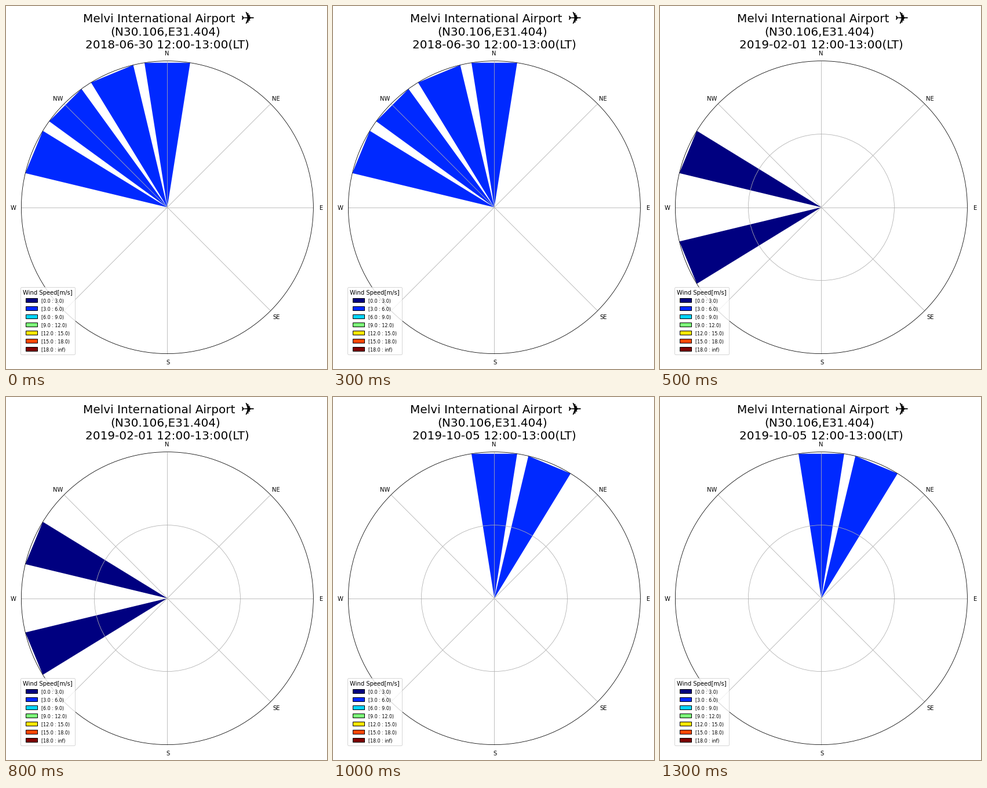
These frames come from a looping animation (554x625 px, 1.5 s). A matplotlib script:

```python
import numpy as np
import matplotlib.pyplot as plt
from matplotlib.animation import FuncAnimation
from matplotlib.patches import Circle, FancyBboxPatch, PathPatch, Polygon, Rectangle
from matplotlib.path import Path
from matplotlib.textpath import TextPath

plt.rcParams["font.family"] = "DejaVu Sans"

W, H, DPI = 554, 625, 72          # at 72 dpi one point is one pixel
CX, CY, R = 278.4, 346.6, 252
GRID = "#b0b0b0"
SPEED_COLORS = plt.cm.jet(np.linspace(0, 1, 7))

# date, speed class, compass bearings of the bars, inner ring shown
SCENES = [
    ("2018-06-30", 1, (292.5, 315, 337.5, 0), False),
    ("2019-02-01", 0, (247.5, 292.5), True),
    ("2019-10-05", 1, (0, 22.5), True),
]

# the tiny margin keeps the pixel size from being truncated
fig = plt.figure(figsize=((W + 1e-6) / DPI, (H + 1e-6) / DPI), dpi=DPI,
                 facecolor="white")
ax = fig.add_axes([0, 0, 1, 1])
ax.set_xlim(0, W)
ax.set_ylim(H, 0)
ax.axis("off")


def label(x, y, text, size, ha="left"):
    return ax.text(x, y, text, fontsize=size, ha=ha, va="baseline",
                   color="black", zorder=7)


def polar(bearing, r=R):
    a = np.radians(bearing)
    return CX + r * np.sin(a), CY - r * np.cos(a)


def draw_plane(x, y, width):
    glyph = TextPath((0, 0), "\u2708", size=20)
    box = glyph.get_extents()
    center = np.array([(box.x0 + box.x1) / 2, (box.y0 + box.y1) / 2])
    scale = width / box.width * np.array([1, -1])
    verts = (glyph.vertices - center) * scale + (x, y)
    ax.add_patch(PathPatch(Path(verts, glyph.codes), fc="black", lw=0, zorder=7))


def draw_compass():
    for bearing in (0, 45, 90, 135):
        (x0, y0), (x1, y1) = polar(bearing), polar(bearing + 180)
        ax.plot([x0, x1], [y0, y1], color=GRID, lw=0.8, zorder=2,
                solid_capstyle="butt")
    ax.add_patch(Circle((CX, CY), R, fill=False, ec="black", lw=0.8, zorder=3))
    for name, x, y in [("N", 278, 85), ("NE", 466, 163), ("E", 544, 351),
                       ("SE", 467, 539), ("S", 279, 617), ("W", 13, 351),
                       ("NW", 90, 163)]:
        label(x, y, name, 10, "center")


def draw_legend():
    ax.add_patch(FancyBboxPatch((25.5, 484.5), 94, 116,
                                boxstyle="round,pad=0,rounding_size=2",
                                fc="white", ec="#cccccc", lw=1, alpha=0.8,
                                zorder=5))
    label(72, 497, "Wind Speed[m/s]", 10, "center")
    for i, color in enumerate(SPEED_COLORS):
        top = f"{3 * i + 3:.1f}" if i < 6 else "inf"
        y = 511 + 14 * i
        ax.add_patch(Rectangle((33.5, y - 7.5), 20, 7, fc=color, ec="black",
                               lw=1, zorder=6))
        label(61, y, f"[{3 * i:.1f} : {top})", 8)


label(133, 28, "Melvi International Airport", 20)
draw_plane(417.5, 20.3, 21)
label(180, 50, "(N30.106,E31.404)", 20)
date_text = label(137, 72, "", 20)
draw_compass()
draw_legend()

ring = ax.add_patch(Circle((CX, CY), R / 2, fill=False, ec=GRID, lw=0.8, zorder=2))
bars = [ax.add_patch(Polygon([(CX, CY)] * 3, lw=0, zorder=1)) for _ in range(4)]


def update(i):
    date, speed, bearings, has_ring = SCENES[i]
    date_text.set_text(f"{date} 12:00-13:00(LT)")
    ring.set_visible(has_ring)
    for k, bar in enumerate(bars):
        bar.set_visible(k < len(bearings))
        if k < len(bearings):
            b = bearings[k]
            bar.set_xy([(CX, CY), polar(b - 9), polar(b + 9)])
            bar.set_facecolor(SPEED_COLORS[speed])
    return [date_text, ring, *bars]


anim = FuncAnimation(fig, update, frames=len(SCENES), interval=500, repeat=True)
plt.show()
```
